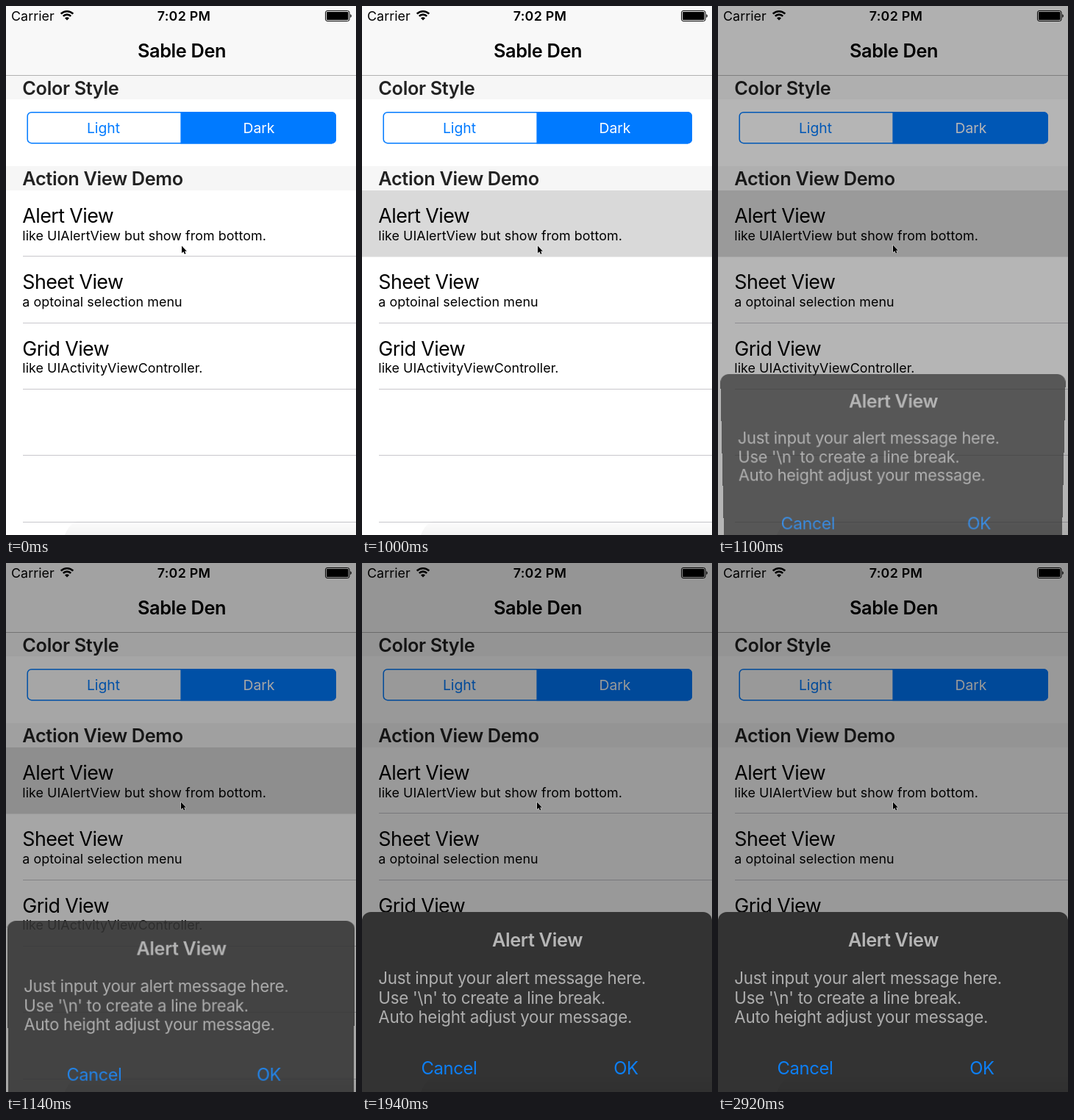
Recreate the animation shown at these times as an HTML page. Size 476 px wide and 720 px high, loop 2940 ms.

```html
<!DOCTYPE html>
<html lang="en">
<head>
<meta charset="utf-8">
<title>Action view demo</title>
<style>
  html, body { margin: 0; width: 100%; height: 100%; overflow: hidden; background: #fff; }
  #stage { position: relative; width: 476px; height: 720px; overflow: hidden; background: #fff; }
  #stage > * { position: absolute; left: 0; top: 0; }
  svg { display: block; }
  text { font-family: Inter, Roboto, sans-serif; }
  .mid { text-anchor: middle; }
  .head { font-size: 25.3px; font-weight: 600; letter-spacing: -.014em; }
  .row { font-size: 26.8px; letter-spacing: -.021em; }
  .sub { font-size: 17.85px; letter-spacing: .004em; }
  .seg { font-size: 19.3px; }
  .msg { font-size: 22.3px; letter-spacing: -.0105em; fill: #afafaf; }
  .btn { font-size: 23.8px; letter-spacing: -.014em; fill: #0d7ff5; }
  #dim { width: 476px; height: 720px; background: #000; }
  #panel { transform-origin: 0 0; }
</style>
</head>
<body>
<div id="stage">
  <svg width="476" height="720" viewBox="0 0 476 720">
    <rect width="476" height="94" fill="#f8f8f8"/>
    <rect y="94" width="476" height="1" fill="#b2b2b2"/>
    <rect y="95" width="476" height="32" fill="#f6f6f6"/>
    <rect y="218" width="476" height="33" fill="#f6f6f6"/>

    <text class="sub" x="7" y="20">Carrier</text>
    <g fill="none" stroke="#000" stroke-width="2.6">
      <path d="M74.7 10.7a11.7 11.7 0 0 1 16.6 0"/>
      <path d="M77.8 13.8a7.3 7.3 0 0 1 10.4 0"/>
      <path d="M83 19.6l-3-3.1a4.2 4.2 0 0 1 6 0z" fill="#000" stroke="none"/>
    </g>
    <text class="sub mid" x="242" y="20" font-weight="600" style="letter-spacing:.015em">7:02 PM</text>
    <rect x="434.5" y="6.5" width="32.5" height="14" rx="2.5" fill="none" stroke="#000"/>
    <rect x="436" y="8" width="29.5" height="11" rx="1" fill="#000"/>
    <path d="M468.3 11a2.8 2.8 0 0 1 0 5z"/>
    <text class="head mid" x="239" y="70">Sable Den</text>

    <text class="head" x="22.3" y="121" fill="#222">Color Style</text>
    <text class="head" x="22.3" y="244.3" fill="#222">Action View Demo</text>

    <rect x="29.2" y="144.7" width="419" height="42" rx="5.5" fill="#fff" stroke="#007aff" stroke-width="1.5"/>
    <path d="M237.4 144H443a6 6 0 0 1 6 6V181.4a6 6 0 0 1 -6 6H237.4z" fill="#007aff"/>
    <text class="seg mid" x="132.5" y="172.8" fill="#007aff">Light</text>
    <text class="seg mid" x="344" y="172.8" fill="#fff">Dark</text>

    <g id="lines" fill="#c8c7cc"></g>
    <rect id="hit" y="251" width="476" height="90.5" fill="#d9d9d9"/>
    <g id="rows"></g>
  </svg>

  <div id="dim"></div>

  <div id="panel">
    <svg width="476" height="290" viewBox="0 0 476 290">
      <path d="M0 290V12a12 12 0 0 1 12 -12H464a12 12 0 0 1 12 12V290z" fill="#333"/>
      <text class="head mid" x="238.5" y="47" fill="#b6b6b6">Alert View</text>
      <g id="message"></g>
      <text class="btn mid" x="118.5" y="221.3">Cancel</text>
      <text class="btn mid" x="359" y="221.3">OK</text>
    </svg>
  </div>

  <svg width="476" height="720" viewBox="0 0 476 720">
    <defs>
      <linearGradient id="fade" x2="0" y2="1">
        <stop stop-opacity="0"/>
        <stop offset="1" stop-opacity=".05"/>
      </linearGradient>
    </defs>
    <path d="M80 720Q88 698 112 698H476V720z" fill="url(#fade)"/>
    <path id="cursor" d="M0 0V11.5L2.7 9.2L4.6 13.2L6.5 12.3L4.7 8.4H8z"
          fill="#000" stroke="#fff" stroke-linejoin="round" paint-order="stroke"/>
  </svg>
</div>
<script>
  const $ = id => document.getElementById(id);
  const LOOP = 2940, STEP = 20;
  const PRESS = 960, SHOW = 1003, SHOW_MS = 276;
  const FADE = 1250, FADE_MS = 390, NUDGE = 1100;
  const PITCH = 90.4;

  const rows = [
    ['Alert View', 'like UIAlertView but show from bottom.'],
    ['Sheet View', 'a optoinal selection menu'],
    ['Grid View', 'like UIActivityViewController.']
  ];
  const message = [
    'Just input your alert message here.',
    "Use '\\n' to create a line break.",
    'Auto height adjust your message.'
  ];

  const label = (cls, y, str) => `<text class="${cls}" x="22.3" y="${y}">${str}</text>`;

  $('rows').innerHTML = rows.map(([title, note], i) =>
    label('row', 295 + i * PITCH, title) + label('sub', 318.5 + i * PITCH, note)).join('');
  $('message').innerHTML = message.map((line, i) => label('msg', 98 + i * 26.7, line)).join('');
  $('lines').innerHTML = [0, 1, 2, 3, 4].map(i =>
    `<rect x="23" y="${Math.round(340.2 + i * PITCH)}" width="453" height="1"/>`).join('');

  const clamp = v => Math.min(1, Math.max(0, v));

  // Panel tilts away at its bottom edge; away runs from 1 (hidden) to 0 (at rest).
  function tilt(away) {
    const turn = away ** 1.5;
    const top = 475 + 95 * away;
    const w = 1 + 0.048 * away;
    const slope = 0.00067 * turn;
    const squash = 1 - 0.076 * turn;
    return `matrix3d(1,0,0,0,
      ${238 * slope},${squash + top * slope},0,${slope.toFixed(8)},
      0,0,1,0,
      ${238 * (w - 1)},${top * w},0,${w})`;
  }

  function draw(t) {
    const away = (1 - clamp((t - SHOW) / SHOW_MS)) ** 3;
    $('dim').style.opacity = 0.4 * (1 - away);
    $('panel').style.opacity = 1 - away;
    $('panel').style.transform = tilt(away);
    $('hit').style.opacity = t < PRESS ? 0 : 1 - clamp((t - FADE) / FADE_MS);
    const shift = t < NUDGE ? 0 : -1;
    $('cursor').setAttribute('transform', `translate(${239 + shift} ${326.5 + shift}) scale(.85)`);
  }

  const start = performance.now();
  function tick() {
    const t = (performance.now() - start) % LOOP;
    draw(Math.floor(t / STEP) * STEP);
    requestAnimationFrame(tick);
  }
  draw(0);
  requestAnimationFrame(tick);
</script>
</body>
</html>
```
